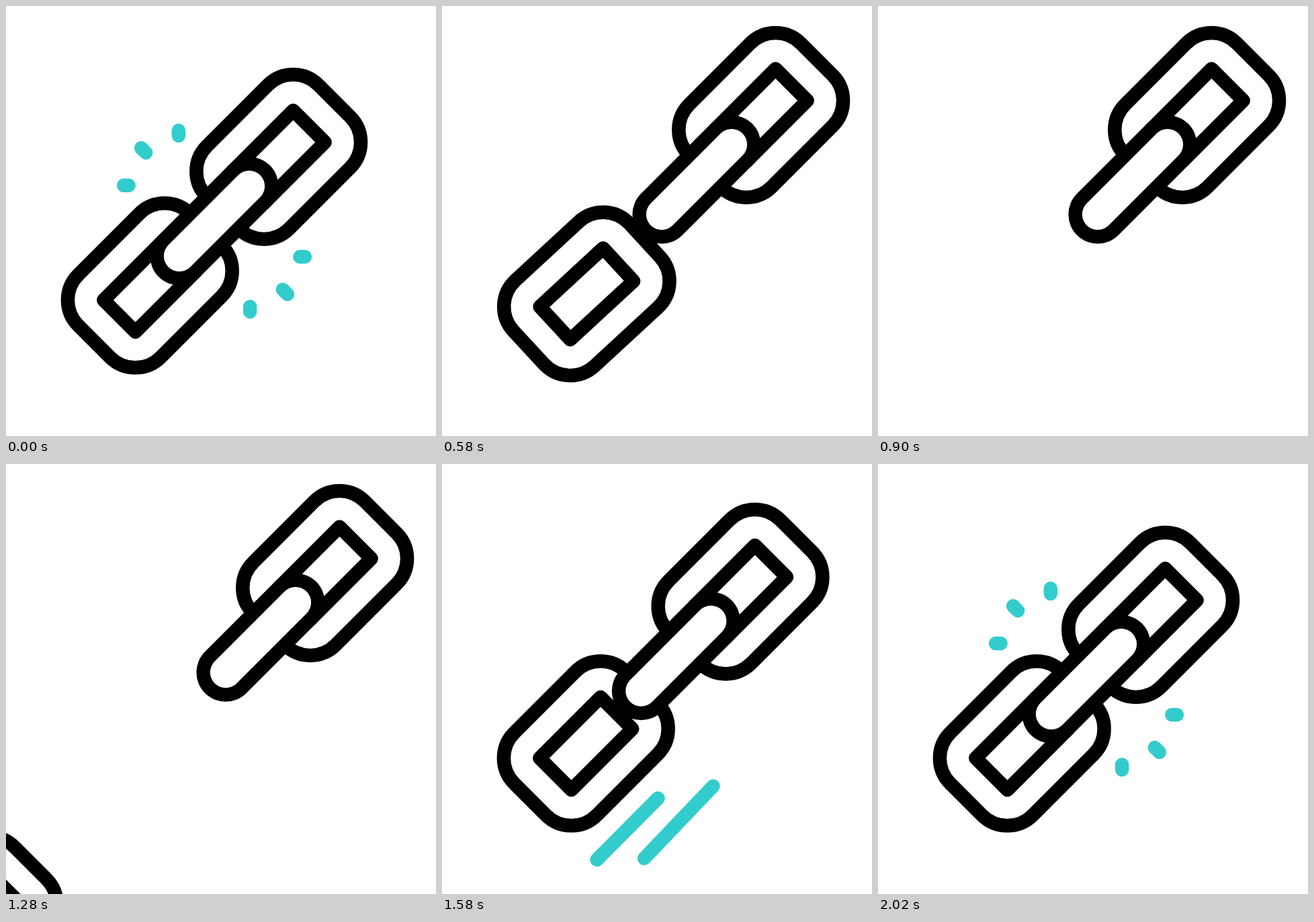
Write an HTML page with a canvas that moves like this. It is 640x640 px and loops after 2320 ms.

```html
<!DOCTYPE html>
<html lang="en">
<head>
<meta charset="utf-8">
<title>Chain link</title>
<style>
  html, body { margin: 0; height: 100%; overflow: hidden; background: #fff; }
  canvas { display: block; width: 100vw; height: 100vh; }
</style>
</head>
<body>
<canvas width="640" height="640"></canvas>
<script>
const ctx = document.querySelector('canvas').getContext('2d');
const LOOP = 2320, STROKE = 20.5, CYAN = '#33cccc';
const CX = 310, CY = 320.2;   // middle of the closed chain
const LINK = 95.7, BAR = 52;  // x and y distance of link centres and bar ends from it

const rad = degrees => degrees * Math.PI / 180;
const ramp = (t, from, to) => Math.min(1, Math.max(0, (t - from) / (to - from)));

function line(x1, y1, x2, y2, width, color) {
  ctx.lineWidth = width;
  ctx.strokeStyle = color;
  ctx.beginPath();
  ctx.moveTo(x1, y1);
  ctx.lineTo(x2, y2);
  ctx.stroke();
}

// cyan dash from (x, y) along (dx, dy), between fractions a and b
function dash(x, y, dx, dy, a, b) {
  if (b - a > 0.001) line(x + dx * a, y + dy * a, x + dx * b, y + dy * b, STROKE, CYAN);
}

function link(x, y, turn = 0) {
  const w = 128.3, h = 66.8, gap = 53.4;
  ctx.save();
  ctx.translate(x, y);
  ctx.rotate(rad(turn - 45));
  ctx.lineWidth = STROKE;
  ctx.strokeStyle = '#000';
  ctx.beginPath();
  ctx.rect(-w / 2, -h / 2, w, h);
  ctx.roundRect(-w / 2 - gap, -h / 2 - gap, w + 2 * gap, h + 2 * gap, gap);
  ctx.stroke();
  ctx.restore();
}

// falls off the stage, then slides back in along the diagonal
function lowerLink(t) {
  const x = CX - LINK, y = CY + LINK;
  if (t < 900) {
    const fall = Math.max(0, (t - 420) / 300) ** 3;
    link(x + 7 * fall, y + 82.8 * fall, 15 * fall);
  } else if (t > 1240) {
    const d = 1.45 * Math.max(0, 1460 - t);
    link(x - d, y + d);
  }
}

function upperPart(t) {
  const away = ramp(t, 240, 400) - ramp(t, 1500, 1680);
  ctx.save();
  ctx.translate(CX + 69 * away, CY - 62 * away);
  link(LINK, -LINK);
  line(-BAR, BAR, BAR, -BAR, 87.2, '#000');
  line(-BAR, BAR, BAR, -BAR, 46.2, '#fff');
  ctx.restore();
}

// a fan of three sparks on each side, growing and shrinking outwards
function sparks(t) {
  const a = t < LOOP / 2 ? ramp(t, 240, 480) : 0;
  const b = t < LOOP / 2 ? 1 : ramp(t, 1780, 2020);
  for (const side of [45, 225]) {
    for (const k of [-1, 0, 1]) {
      const place = rad(side + 23.5 * k), aim = rad(side + 45 * k);
      const far = 154 - 9 * Math.abs(k), size = 10 - 2.4 * Math.abs(k);
      const dx = size * Math.cos(aim), dy = size * Math.sin(aim);
      dash(CX + far * Math.cos(place) - dx, CY + far * Math.sin(place) - dy, dx, dy, a, b);
    }
  }
}

function streaks(t) {
  dash(230.5, 589, 91, -91.5, ramp(t, 1640, 1780), ramp(t, 1372, 1580));
  dash(301, 587, 102.5, -107.5, ramp(t, 1600, 1740), ramp(t, 1326, 1580));
}

function draw(t) {
  ctx.fillStyle = '#fff';
  ctx.fillRect(0, 0, 640, 640);
  ctx.lineCap = ctx.lineJoin = 'round';
  for (const part of [lowerLink, upperPart, streaks, sparks]) part(t);
}

let start;
function tick(now) {
  start ??= now;
  draw((now - start) % LOOP);
  requestAnimationFrame(tick);
}
draw(0);
requestAnimationFrame(tick);
</script>
</body>
</html>
```
